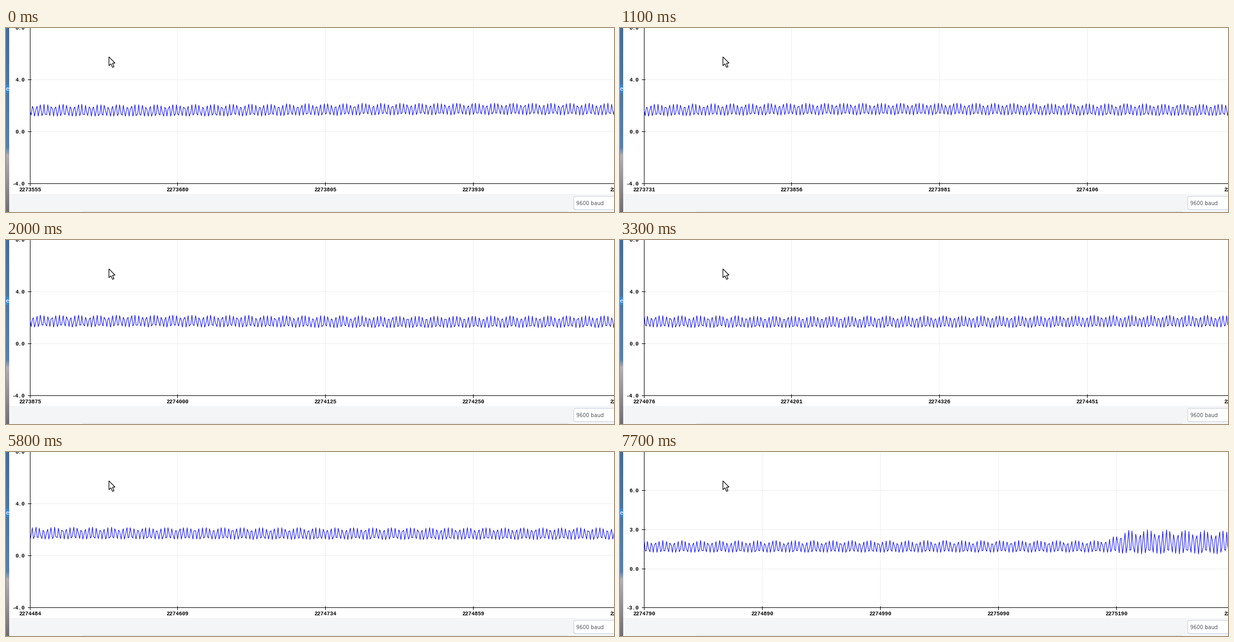
A matplotlib script that plays this animation: 1143 px wide and 347 px high, repeating every 8 s.

```python
import numpy as np
import matplotlib.pyplot as plt
from matplotlib.animation import FuncAnimation
from matplotlib.patches import FancyBboxPatch, Polygon, Rectangle

W, H, DPI = 1143, 347, 72          # at 72 dpi one point is one pixel
STEP, FRAMES = 100, 80
LEFT, BASE = 45, 293               # corner of the plot axes
PX_SAMPLE, PX_UNIT = 2.222, 24.5
FIRST, SHOWN = 2273555, 500
RESCALE, BURST = 7200, 1635        # ms of the axis change, sample of the burst


def repaints():
    """Steady repaints, a stall, then a slower uneven beat with one late step."""
    slow = [3300 + STEP * (int(2.58 * n - .5) + (n > 12)) for n in range(18)]
    return [*range(0, 2500, STEP), *slow]


TICKS = repaints()


def scroll(ms):
    """Samples scrolled past the left edge, about 16 per 100 ms."""
    return round(np.interp(ms, [0, 2400, 3300, 4700, 7700],
                           [0, 384, 521, 752, 1235]))


def signal(k):
    """Skewed hum of about 3.2 samples per cycle, with a burst near the end."""
    burst = (1 + np.tanh((k - BURST) / 8)) / 2 * (1 - .0015 * (k - BURST))
    angle = 2 * np.pi * (.2188 + (.3125 - .000147) * k - .065 * burst)
    shape = np.cos(angle) - .27 * np.sin(angle) + .12 * np.cos(2 * angle) - .1
    sway = -.09 * np.cos(2 * np.pi * (k - 100) / 600) * np.exp(-k / 600)
    return 1.685 + sway + .37 * burst + (.45 + .47 * burst) * shape


fig = plt.figure(figsize=(W / DPI, H / DPI), dpi=DPI, facecolor="white")
ax = fig.add_axes([0, 0, 1, 1])


def box(x, y, w, h, color, z=1):
    return ax.add_patch(Rectangle((x, y), w, h, fc=color, ec="none", lw=0,
                                  zorder=z))


def line(x0, y0, x1, y1, color="black", z=3):
    """One-pixel line through whole pixels, both ends included."""
    return box(x0, y0, x1 - x0 + 1, y1 - y0 + 1, color, z)


def label(x, y, s, ha, font="DejaVu Sans", size=10, color="black", **kw):
    return ax.text(x, y, s, ha=ha, va="baseline", family=font, size=size,
                   color=color, zorder=4, clip_on=True, **kw)


def axis_label(x, y, s, ha):
    return label(x, y, s, ha, "Liberation Mono", weight="bold")


def draw_desktop():
    stops = [0, 225, 240, H]
    tones = [(66, 108, 154), (88, 128, 172), (178, 174, 178), (112, 108, 112)]
    strip = np.stack([np.interp(np.arange(H), stops, c) for c in zip(*tones)],
                     axis=-1) / 255
    ax.imshow(strip[:, None, :], extent=(0, 6, H, 0), aspect="auto", zorder=0)
    box(0, 107, 6, 15, "#3b86dc")
    label(-.5, 118, "e", "left", color="white")


def draw_footer():
    box(6, 313, W - 6, H - 313, "#f4f5f7")
    for i, c in enumerate(("#f1f2f4", "#ebecee", "#e5e6e8")):
        box(146 - 2 * i, 344 + i, 908 + 4 * i, 1, c, 2)
    ax.add_patch(FancyBboxPatch((1067.5, 317.5), 100, 25, fc="white",
                                ec="#c6d0de", lw=1, zorder=3, snap=False,
                                boxstyle="round,pad=0,rounding_size=3"))
    label(1072, 334, "9600 baud", "left", size=9.6, color="#50545a")


def draw_cursor():
    ax.add_patch(Polygon([(193.5, 54.5), (193.5, 71), (197.3, 67.6),
                          (200.3, 74.2), (203, 73), (200.2, 66.5),
                          (205, 66.2)], closed=True, fc="white", ec="#111111",
                         lw=1.3, zorder=6))


def draw_scale(low, step, span):
    """Grid, ticks and labels of one axis setting."""
    parts, names = [], []
    for i in range(4):
        y = round(BASE - i * step * PX_UNIT)
        parts.append(axis_label(35.5, y + 4, f"{low + i * step:.1f}", "right"))
        parts.append(line(41, y, 47, y))
        if i:
            parts.append(line(LEFT, y, W, y, "#eeeeee", 1))
    for n in range(0, SHOWN + 1, span):
        x = int(LEFT + n * PX_SAMPLE)
        names.append((n, axis_label(x + .5, 308, "", "center")))
        parts.append(line(x, 291, x, 297))
        if n:
            parts.append(line(x, 0, x, BASE, "#eeeeee", 1))
    return low, parts, names


draw_desktop()
draw_footer()
draw_cursor()
line(LEFT, 0, LEFT, BASE)
line(LEFT, BASE, W, BASE)
scales = [draw_scale(-4, 4, 125), draw_scale(-3, 3, 100)]
trace, = ax.plot([], [], color="#0000ff", lw=1, zorder=5, snap=False,
                 solid_joinstyle="miter")
ax.set_xlim(0, W)
ax.set_ylim(H, 0)
ax.axis("off")


def update(frame):
    now = max(t for t in TICKS if t <= frame * STEP)
    start = scroll(now)
    active = int(now >= RESCALE)
    for i, (_, parts, names) in enumerate(scales):
        for part in parts:
            part.set_visible(i == active)
        for n, text in names:
            text.set_text(str(FIRST + start + n) if i == active else "")
    n = np.arange(SHOWN)
    x = np.floor(LEFT + n * PX_SAMPLE)
    y = np.floor(BASE - (signal(start + n) - scales[active][0]) * PX_UNIT)
    trace.set_data(x + .5, y + .5)
    return [trace]


anim = FuncAnimation(fig, update, frames=FRAMES, interval=STEP, repeat=True,
                     repeat_delay=0, init_func=lambda: update(0))
plt.show()
```
